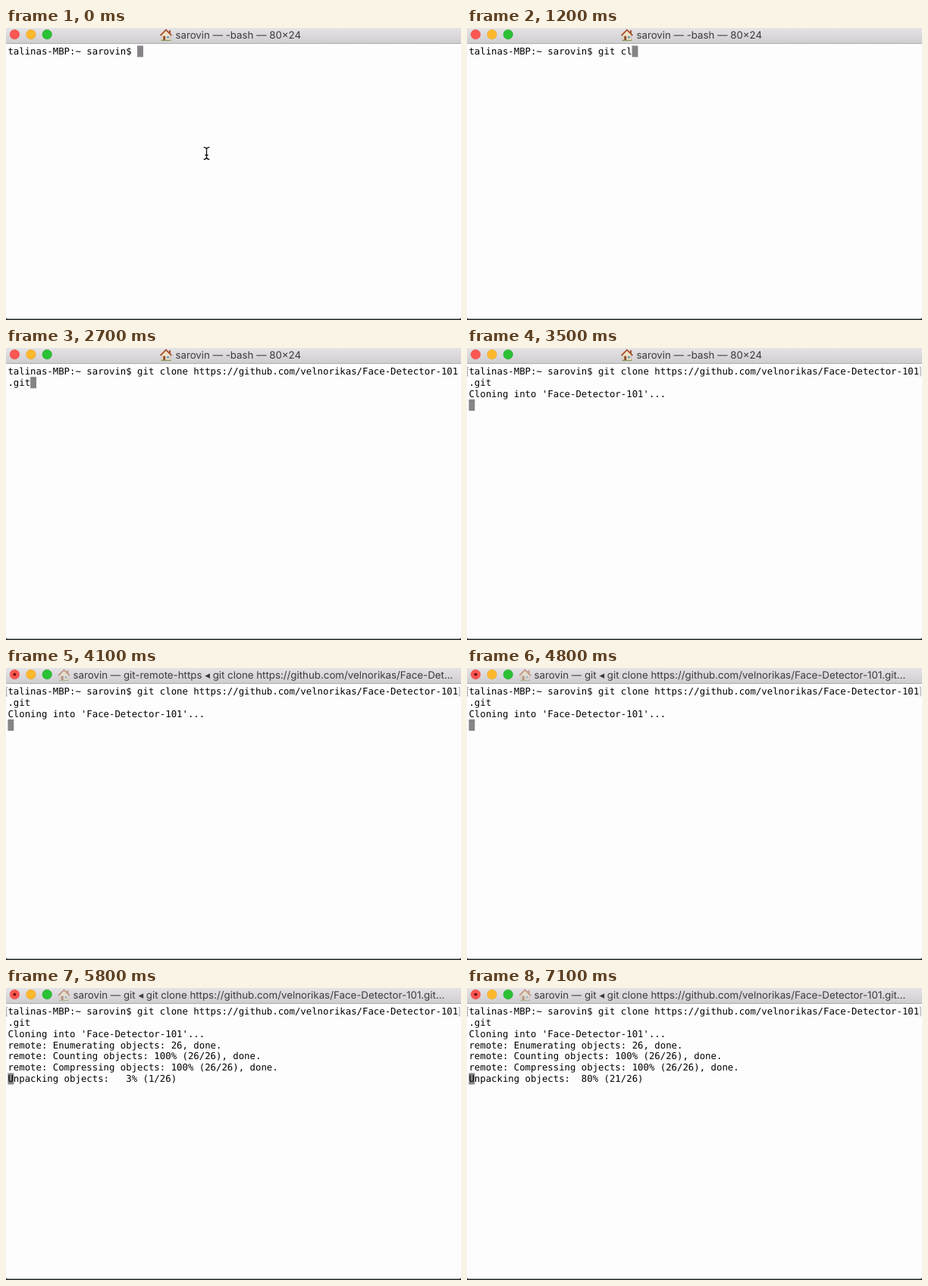
These frames come from a looping animation (600x386 px, 8000 ms). An HTML page:

```html
<!DOCTYPE html>
<html lang="en">
<head>
<meta charset="utf-8">
<title>Terminal clone</title>
<style>
  html, body { margin: 0; width: 100%; height: 100%; overflow: hidden; background: #fefdfe; }
  svg { display: block; width: 600px; height: 386px; }
  text { white-space: pre; text-rendering: geometricPrecision; font-variant-ligatures: none; }
  #rows text { font: 12.33px "DejaVu Sans Mono", monospace; fill: #000; }
  #title { font: 13.3px Inter, sans-serif; fill: #3c3a3c; }
  #title .arrow { font-family: "DejaVu Sans", sans-serif; }
</style>
</head>
<body>
<svg viewBox="0 0 600 386">
  <defs>
    <linearGradient id="bar" x2="0" y2="1">
      <stop offset="0" stop-color="#e5e3e5"/>
      <stop offset="1" stop-color="#cfcdcf"/>
    </linearGradient>
  </defs>
  <rect width="600" height="386" fill="#fefdfe"/>
  <rect width="600" height="21" fill="url(#bar)"/>
  <rect y="20" width="600" height="1" fill="#aeacae"/>
  <path d="M0 382Q0 384.6 3 384.6H597Q600 384.6 600 382V386H0Z" fill="#1c2426"/>

  <g stroke-width=".6">
    <circle cx="11.4" cy="8.5" r="6.2" fill="#fc5652" stroke="#e0443f"/>
    <circle cx="32.9" cy="8.5" r="6.2" fill="#fdb92c" stroke="#dfa023"/>
    <circle cx="54.2" cy="8.5" r="6.2" fill="#2bc136" stroke="#1fa52a"/>
  </g>
  <circle id="busy" cx="11.4" cy="8.5" r="2.1" fill="#7d100d"/>

  <g id="home">
    <path d="M12 2.5h2v5h-2z" fill="#a5502f"/>
    <path d="M2.5 8.5 8 3l5.5 5.5V16h-11z" fill="#f0e2c4" stroke="#b9a584" stroke-width=".5"/>
    <path d="M.6 9.2 8 1.8l7.4 7.4" fill="none" stroke="#a9512f" stroke-width="1.8"/>
    <path d="M4.2 10h3v6h-3z" fill="#8a4f2c"/>
    <path d="M9 10.2h3v2.8H9z" fill="#6d9cc0"/>
    <path d="M1.5 15.2h13v1.2h-13z" fill="#7f9a55"/>
  </g>
  <text id="title" y="13.6"></text>

  <rect id="cursor" width="7.9" height="15" fill="#868486"/>
  <g id="rows"></g>
  <path id="marks" d="M2 25.5H.6V37H2M596.8 25.5H598.2V37H596.8" fill="none" stroke="#a09ea0"/>
  <path id="beam" d="M260.6 157.6q3.2 0 3.9 2.4q.7-2.4 3.9-2.4M260.6 173.6q3.2 0 3.9-2.4q.7 2.4 3.9 2.4M264.5 160v11.2M262.4 168h4.2"
        fill="none" stroke="#111" stroke-width="1.3"/>
</svg>
<script>
const LOOP = 8000, COLS = 80, CELL = 7.42, LINE = 14.85, LEFT = 2.4, TOP = 23.4;
const user = 'sarovin';
const prompt = `talinas-MBP:~ ${user}$ `;
const repo = 'Face-Detector-101';
const url = `https://github.com/velnorikas/${repo}.git`;
const command = `git clone ${url}`;

// [time, characters typed]
const typing = [
  [0, 0], [200, 1], [400, 2], [500, 3], [700, 4], [1000, 5], [1200, 6],
  [1400, 7], [1600, 8], [1700, 9], [1900, 10], [2700, command.length]
];

const cloning = `Cloning into '${repo}'...`;
const listed = 'remote: Enumerating objects: 26, done.';
const progress = (label, n) =>
  `${label} objects: ${String(Math.floor(n / 26 * 100)).padStart(3)}% (${n}/26)`;
const counting = n => progress('remote: Counting', n);
const packing = n => progress('remote: Compressing', n);
const done = line => line + ', done.';
const unpacking = n =>
  [cloning, listed, done(counting(26)), done(packing(26)), progress('Unpacking', n)];

// [time, lines below the command]; the cursor sits on the last one
const output = [
  [0, []],
  [3500, [cloning, '']],
  [5500, [cloning, listed, counting(9)]],
  [5600, [cloning, listed, done(counting(26)), packing(13)]],
  [5800, unpacking(1)],
  [6000, unpacking(15)],
  [7000, unpacking(21)]
];

const running = (name, tail) => `${user} — ${name} ◂ git clone ${tail}...`;
// [time, window title]
const titles = [
  [0, `${user} — -bash — 80×24`],
  [3600, running('git-remote-https', url.slice(0, -13))],
  [4800, running('git', url)]
];

const $ = id => document.getElementById(id);
const at = (table, t) => table.findLast(step => step[0] <= t)[1];
const show = (id, on) => $(id).setAttribute('visibility', on ? 'visible' : 'hidden');

const svgNS = 'http://www.w3.org/2000/svg';
const rows = Array.from({ length: 7 }, (_, i) => {
  const row = document.createElementNS(svgNS, 'text');
  row.setAttribute('x', LEFT);
  row.setAttribute('y', TOP + 11.6 + i * LINE);
  return $('rows').appendChild(row);
});

let shownTitle = '';
function setTitle(text, busy) {
  if (text === shownTitle) return;
  shownTitle = text;
  $('title').innerHTML = text.replace('◂', '<tspan class="arrow">◂</tspan>');
  $('title').setAttribute('x', busy ? 88.6 : 223.4);
  $('home').setAttribute('transform', `translate(${busy ? 68.5 : 203} .6)`);
  $('home').setAttribute('opacity', busy ? .5 : 1);
}

function draw(t) {
  const line = prompt + command.slice(0, at(typing, t));
  const printed = at(output, t);
  const lines = [line.slice(0, COLS), line.slice(COLS), ...printed];
  rows.forEach((row, i) => {
    const text = lines[i] || '';
    if (row.textContent !== text) row.textContent = text;
  });

  const col = printed.length ? 0 : line.length % COLS;
  const rowIndex = printed.length ? lines.length - 1 : Math.floor(line.length / COLS);
  $('cursor').setAttribute('x', LEFT + col * CELL);
  $('cursor').setAttribute('y', TOP + rowIndex * LINE);

  const busy = t >= 3600;
  setTitle(at(titles, t), busy);
  show('busy', busy);
  show('marks', t >= 3500);
  show('beam', t < 200);
}

const start = performance.now();
function tick() {
  draw((performance.now() - start) % LOOP);
  requestAnimationFrame(tick);
}
tick();
</script>
</body>
</html>
```
